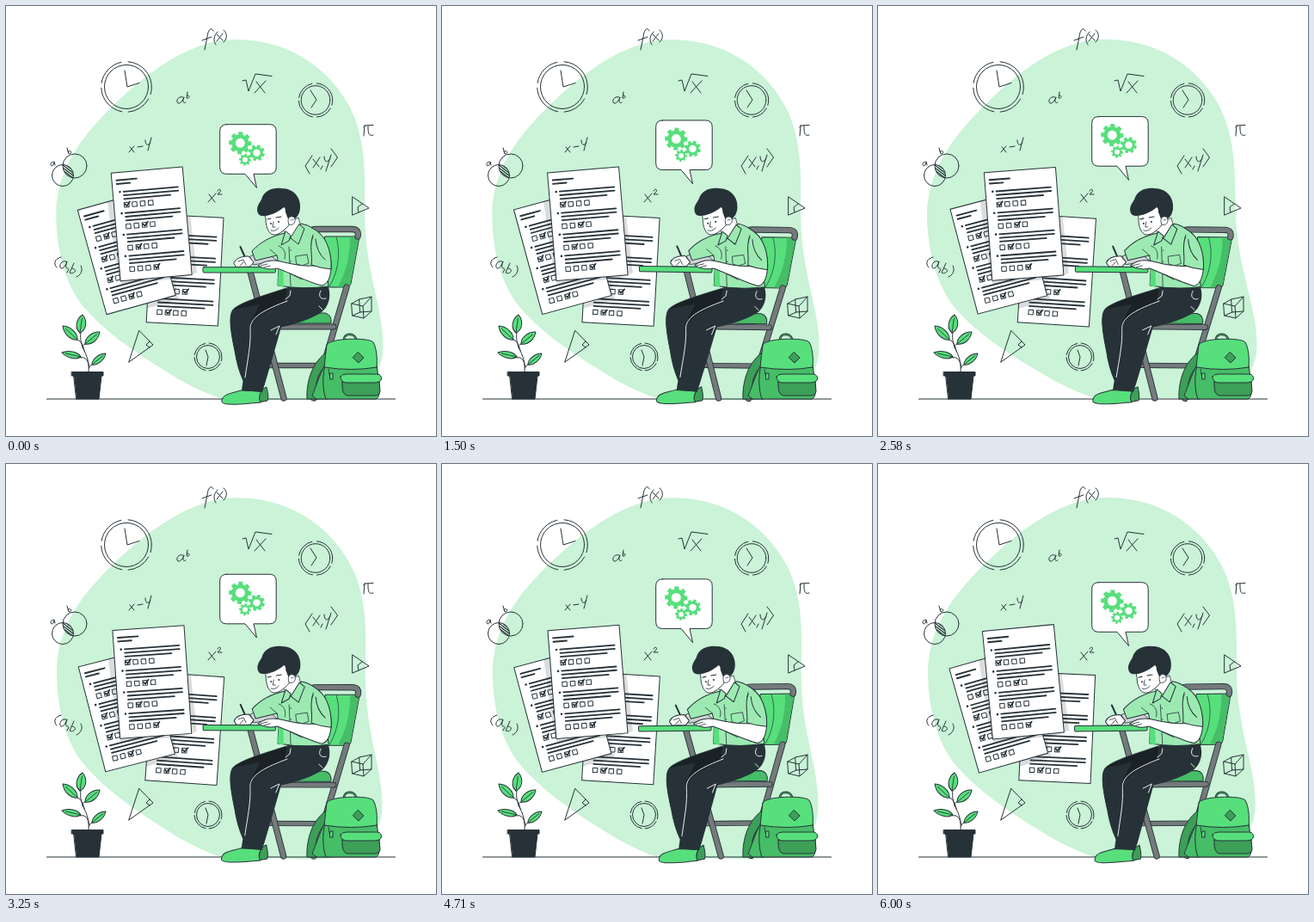
These frames come from a looping animation (500 px wide and 500 px high, 6040 ms). An HTML page with a canvas:

```html
<!DOCTYPE html>
<html lang="en">
<head>
<meta charset="utf-8">
<title>Exam desk</title>
<style>
html, body { margin: 0; width: 100%; height: 100%; overflow: hidden; background: #fff; }
canvas { display: block; width: 500px; height: 500px; }
</style>
</head>
<body>
<canvas id="stage"></canvas>
<script>
const LOOP = 6040, TAU = Math.PI * 2, DEG = Math.PI / 180;
const INK = '#263238', GREEN = '#57df7c', SHADE = '#46bd67', DEEP = '#3d9f58',
      MIST = '#caf3d7', SHIRT = '#9ceab2', STEEL = '#757a7c', WHITE = '#fff';

const cv = document.getElementById('stage');
const c = cv.getContext('2d');
const dpr = window.devicePixelRatio || 1;
cv.width = cv.height = 500 * dpr;

const paths = {};
const path = d => paths[d] || (paths[d] = new Path2D(d));

function draw(d, fill, stroke, w = 1) {
  if (fill) { c.fillStyle = fill; c.fill(path(d)); }
  if (stroke) { c.strokeStyle = stroke; c.lineWidth = w; c.stroke(path(d)); }
}
const shape = (d, fill) => draw(d, fill, INK, 1);
const line = (d, w = 1, color = INK) => draw(d, null, color, w);

function circle(x, y, r, fill, stroke, w = 1) {
  c.beginPath();
  c.arc(x, y, r, 0, TAU);
  if (fill) { c.fillStyle = fill; c.fill(); }
  if (stroke) { c.strokeStyle = stroke; c.lineWidth = w; c.stroke(); }
}

function turned(x, y, angle, fn) {
  c.save();
  c.translate(x, y);
  c.rotate(angle);
  c.translate(-x, -y);
  fn();
  c.restore();
}

// Smooth curve through [time, value] points
function curve(pts, t) {
  let i = 0;
  while (i < pts.length - 2 && t > pts[i + 1][0]) i++;
  const slope = k => {
    const a = pts[Math.max(k - 1, 0)], b = pts[Math.min(k + 1, pts.length - 1)];
    return (b[1] - a[1]) / (b[0] - a[0]);
  };
  const [t0, v0] = pts[i], [t1, v1] = pts[i + 1];
  const h = t1 - t0, u = (t - t0) / h, u2 = u * u, u3 = u2 * u;
  return v0 * (2 * u3 - 3 * u2 + 1) + v1 * (3 * u2 - 2 * u3)
    + h * (slope(i) * (u3 - 2 * u2 + u) + slope(i + 1) * (u3 - u2));
}
const paperSwing = [[0, 0], [1500, 0.2], [2580, 0.7], [3250, 1], [4130, 0.8], [5330, 0], [6040, -0.5]];

function blob() {
  draw('M58 240C59 198 80 163 107 134C150 88 207 39 266 39C336 39 380 80 400 119C420 160 416.500 205 417 245C418 310 439 350 439 395C439 436 410 458 358 458L252 457C226 448 207 438 188 426C148 402 114 378 90 350C68 323 58 282 58 240Z', MIST);
}

function clock(x, y, r, R, hands) {
  circle(x, y, r, null, INK);
  c.lineWidth = 1;
  for (const [a, b] of [[-1.5, 0.3], [0.5, 1.5], [1.75, 3.1], [3.3, 4.5]]) {
    c.beginPath();
    c.arc(x, y, R, a, b);
    c.stroke();
  }
  line(hands);
}

function symbols() {
  line('M241 29C239 24 235 27 234 36L231 51M228 40L239 36');
  line('M246 30C241 35 241 41 244 45M245 33L252 40M252 32L245 41M253 28C258 32 257 39 253 42');
  line('M275 87L279 86L282 99L290 79L309 81.500M291 88L301 101M302 87L289 101');
  line('M206 106C200 104 197 111 200 113C203 114 206 109 207 106C205 111 206 114 209 112M211 100L210 107C213 108 215 104 211 104');
  line('M144 164L149 170M149 163L143 170M153 164L159 163M162 156C162 162 165 163 168 159M169 153L165 168');
  line('M236 219L243 228M244 218L235 228M246 215C247 212 251 213 249 216L246 219L251 219');
  line('M416 141L417 139L427 138.500M417 139L416 151M421 139C421 147 421 152 427 150');
  line('M356 174L348 186L353 195M357 178L364 187M365 176L357 188M368 186L366 190M370 175C370 182 374 183 377 177M378 173L372 192M378 166L385.500 176L378 187');
  line('M64 292C56 294 55 300 59 304M70 297C64 295 61 303 64 305C67 306 70 300 71 297C69 302 69 306 72 305M73 306L71 310M79 299L74 310C79 313 84 306 77 305M87 302C90 307 87 313 82 315');

  // Overlapping sets
  c.save();
  c.beginPath(); c.arc(80, 186, 14, 0, TAU); c.clip();
  c.beginPath(); c.arc(66, 197, 12.5, 0, TAU); c.clip();
  for (let k = 0; k < 9; k++) line(`M62 ${173 + k * 3}L82 ${188 + k * 3}`, 1.2);
  c.restore();
  circle(80, 186, 14, null, INK);
  circle(66, 197, 12.5, null, INK);
  line('M55 181C52 181 51 185 53 186C55 186 56 183 56 181L57 185M71 165L73 172C77 172 77 167 72 169');

  clock(140, 94, 25.5, 29.3, 'M138 75L141 94L155 89.500');
  clock(360, 109.5, 16.8, 19.7, 'M354 98L361 109L355 118');
  clock(235, 408, 13.5, 16, 'M232 400L235 408L233 418');

  line('M155 377.500L171 394L143 414ZM167 390L163 394L167 397');
  line('M403 222L422 235L403 243ZM410 240L409 234L414 230');
  line('M402 346L415 349L416 363L403 360ZM411 341L425 338L425 355L412 356ZM402 346L411 341M415 349L425 338M416 363L425 355M403 360L412 356');
}

function leaf(x0, y0, x1, y1, w) {
  c.save();
  c.translate(x0, y0);
  c.rotate(Math.atan2(y1 - y0, x1 - x0));
  const n = Math.hypot(x1 - x0, y1 - y0);
  shape(`M0 0C${n * 0.2} ${-w} ${n * 0.7} ${-w} ${n} 0C${n * 0.7} ${w} ${n * 0.2} ${w} 0 0Z`, GREEN);
  line(`M0 0L${n * 0.8} 0`, 0.8);
  c.restore();
}

function plant() {
  line('M96 426C98 402 84 399 87 379M83 388C89 390 90 398 91 401M87 409C93 407 96 414 96.500 419M92 393Q88 394 89 398M100 417Q97 418 96.500 421');
  leaf(86, 380, 89, 359, 7);
  leaf(83, 388, 66, 372, 6);
  leaf(92, 393, 109, 379, 6);
  leaf(87, 408, 65, 403, 5);
  leaf(100, 417, 116, 404, 5);
  shape('M79 430L111 430L108 457L82 457Z', INK);
  shape('M76.500 425.500H113V430H76.500Z', INK);
}

// Question sheet; checks[k] is the ticked box of question k
function sheet(x, y, angle, checks) {
  c.save();
  c.translate(x, y);
  c.rotate(angle * DEG);
  shape('M0 0H83.300V126H0Z', WHITE);
  line('M5.500 9H29M5.500 13.300H21', 1.9);
  checks.forEach((tick, k) => {
    c.save();
    c.translate(0, k * 25);
    circle(8.3, 22.8, 1.3, INK);
    line('M12.500 22.800H76M12.500 27.100H76M12.500 31.400H66.500', 1.8);
    for (let b = 0; b < 4; b++) {
      const bx = 12 + b * 9.4;
      line(`M${bx} 35.700h5.400v5.400h-5.400Z`);
      if (b === tick) line(`M${bx + 1} 37.500l2 2.200l3.800 -4.700`, 1.7);
    }
    c.restore();
  });
  c.restore();
}

function shadow(clip, d) {
  c.save();
  c.clip(path(clip));
  c.globalAlpha = 0.17;
  draw(d, INK);
  c.restore();
}

function papers() {
  const left = 'M83.500 237.500L163.500 215L197 336L117 358Z';
  const back = 'M170 242L253 246L246.500 371L163.500 367Z';
  sheet(169.8, 241.9, 3, [1, 2, 3, 1]);
  shadow(back, 'M160 241L214 243L222 310L196 320L201 341L160 353Z');
  sheet(83.3, 237.3, -15.5, [1, 0, 0, 2]);
  shadow(left, 'M117 222L130 312L134 324L200 317L200 200Z');
  sheet(122.2, 194.2, -5, [0, 2, 1, 3]);
}

function gear(x, y, r, hole, turn) {
  c.beginPath();
  const root = r * 0.76;
  for (let k = 0; k < 8; k++) {
    const a = turn + k * TAU / 8;
    for (const [da, q] of [[-0.25, root], [-0.19, r], [0.19, r], [0.25, root]])
      c.lineTo(x + q * Math.cos(a + da), y + q * Math.sin(a + da));
  }
  c.closePath();
  c.moveTo(x + hole, y);
  c.arc(x, y, hole, 0, TAU);
  c.fillStyle = GREEN;
  c.fill('evenodd');
}

function bubble() {
  shape('M256.500 137.700H306.500Q314.200 137.700 314.200 145.500V187.500Q314.200 195.300 306.500 195.300H288L291.500 211.500L278 195.300H256.500Q248.700 195.300 248.700 187.500V145.500Q248.700 137.700 256.500 137.700Z', WHITE);
  gear(272.3, 159.3, 13.3, 5.5, 0.05);
  gear(291.5, 170.8, 9.6, 4.2, 0.3);
  gear(278, 178.8, 7, 3, 0.1);
}

function tube(d, w = 5.5) {
  line(d, w + 1.8);
  line(d, w, STEEL);
}

function chair() {
  tube('M305 418H366', 4.5);
  tube('M284 309L323 456');
  shape('M371 268H411L401 323Q400 327 395 327H366Z', GREEN);
  draw('M410.500 268.500L400.500 323Q399.500 326.500 395 326.500H386C396 308 400 290 400 268.500Z', SHADE);
  line('M384 269C390 290 385 312 376 326', 0.7);
  tube('M352 264Q354 259.500 360 259.500H402Q411 259.500 409 268');
  tube('M396 327L358 456');
  shape('M286 367C288 358 308 356 330 357H371Q379 359 378 369H290Z', SHADE);
  tube('M285 373H381', 5);
}

function legs() {
  shape('M297 446L303 443C304 449 306 454 304 459L293 461Z', DEEP);
  draw('M326 328C302 336 273 344 264 353C258 361 262 382 266 401C268 414 271 425 276 436L300 441L318 374L350 355Z', '#1a2226', INK, 0.8);
  draw('M264 353C258 361 262 382 266 401C268 414 271 425 276 436L286 400L283 370L295 347Z', INK);
  shape('M251.500 457C253 451 264 450 273 447L297 448C294 453 294 458 296 461C282 462 270 464 258 463C250 462 250 460 251.500 457Z', GREEN);
  draw('M327 327H375C379 341 373 353 364 358C350 366 332 371 320 373.500C313 399 305 426 298 449L274 447C277 423 285 400 285 377C284 363 302 356 324 345Z', INK);
  line('M327 343C304 352 283 361 284 376C285 393 281 411 278 432M331 331L330 337L325 341M366 331C362 338 367 342 372 340M364 349L368 353M308 377L318 372L314 382', 0.9, WHITE);
}

function torso() {
  draw('M284 291L301 284L315 296L288 301Z', '#cfd3d4', INK, 0.8);
  shape('M325 264C309 267 295 275 286 285L290 296L315 290L317 300L316 325Q345 330 375 326L373 305L378 306C379 289 372 267 359 260Q351 254 343 253L334 263Z', SHIRT);
  draw('M317 299L322 300L323 327L316 325Z', GREEN);
  line('M317 279C323 281 326 287 324 294M315 290L307 283M329 280L331 326M357 266C353 276 357 291 356 300M344 318L330 311', 0.8);
  line('M337 291L350 289L352 299L344 302L338 300Z', 0.8);
  // Neck and collar
  draw('M325 253L340 246L343 257L331 271L323 262Z', WHITE, INK, 0.8);
  shape('M325 262L320 278L329 273L331 267Z', SHIRT);
  shape('M341 254L347 259L340 277L331 270Z', SHIRT);
  circle(331, 284, 0.7, INK);
  circle(331, 297, 0.7, INK);
}

function head() {
  draw('M300 238L302 247C302 255 304 262 309 265.500C316 268 323 261 328 256L335 246L329 231Z', WHITE, INK, 0.9);
  draw('M293 241C290 234 295 229 297 225C300 214 311 211 320 212C335 212 343 223 342 235C341.500 241 339 245 336 247L331 250C328 249 327 245 326 242C324 239 326 236 323 234C315 241 304 245 297 244Q294 243.500 293 241Z', INK);
  draw('M328 249C328 244 335 243 336 248C337 252 333 256 329 254Z', WHITE, INK, 0.8);
  line('M331 249L334 248', 0.7);
  line('M304 248L308 247M314 246L320 245', 1.1);
  circle(308, 253, 1, INK);
  circle(317, 251, 1, INK);
  line('M311 251L310 257L313 257M308 261Q313 263 317 258', 0.8);
}

function desk() {
  shape('M230 303.700H312Q313.500 303.700 313.500 305V308.500Q313.500 310 312 310H230Q229 310 229 308.500V305Q229 303.700 230 303.700Z', GREEN);
}

function arms() {
  line('M272.500 280L281 299', 2);
  shape('M265 299C267 293 274 291 282 291L288 298L284 303L268 303.500Z', WHITE);
  line('M270 297L276 295L279 301M272 302L276 298', 0.8);
  shape('M378 305C377 316 374 324 367 325C351 321 330 310 315 305C309 307 300 306 293 302C299 297 308 295 317 296.500C332 300 345 303 358 302Z', WHITE);
  line('M296 302L304 300M300 304L307 302', 0.8);
  draw('M357 268C352 279 357 290 355 301Q366 305 378 306C379 289 374 271 363 263Z', SHIRT);
  line('M357 268C352 279 357 290 355 301Q366 305 378 306C379 289 374 271 363 263M360 271Q361 286 371 295');
}

function backpack() {
  line('M393 388C393 380 405 380 407 387', 2.6);
  line('M393 388C393 380 405 380 407 387', 1, SHADE);
  shape('M374 402C356 413 349 437 350 457H362C357 442 363 425 374 416Z', DEEP);
  shape('M371 417C364 430 360 444 356 453L361 457H374L373 426Z', SHADE);
  shape('M371 418C367 432 369 450 372 457H430Q436 455 434 438L431 418Z', SHADE);
  shape('M373 394C375 386 422 385 427 391C431 398 432 410 431 420Q402 425 370 420C371 411 372 402 373 394Z', GREEN);
  shape('M391 437H434L435 448Q434 453 428 453H397Q390 452 391 437Z', DEEP);
  shape('M389 431Q391 428 396 428H432Q437 429 436.500 434Q435 438 428 438H395Q389 437 389 431Z', GREEN);
  shape('M409.500 402.500L416 409L410 415L403.500 409Z', DEEP);
  shape('M377 427H380V434H377Z', GREEN);
  line('M375 422L376 429', 0.8);
}

function frame(now) {
  const t = now % LOOP;
  const sway = 0.75 * Math.sin(TAU * t / 7000) * DEG;
  const roll = -Math.cos(TAU * (t - 2580) / (LOOP / 4)) * DEG;
  const lift = -4.8 * (1 - Math.cos(TAU * t / LOOP));

  c.setTransform(dpr, 0, 0, dpr, 0, 0);
  c.lineCap = c.lineJoin = 'round';
  c.fillStyle = WHITE;
  c.fillRect(0, 0, 500, 500);

  turned(248, 300, roll, blob);
  symbols();
  line('M47.500 457H452.500', 1.1);
  plant();
  turned(165, 290, curve(paperSwing, t) * DEG, papers);
  turned(320, 345, sway, () => {
    chair();
    legs();
    torso();
    head();
    desk();
    arms();
  });
  backpack();
  c.save();
  c.translate(0, lift);
  bubble();
  c.restore();
}

const start = performance.now();
function tick() {
  frame(performance.now() - start);
  requestAnimationFrame(tick);
}
tick();
</script>
</body>
</html>
```
